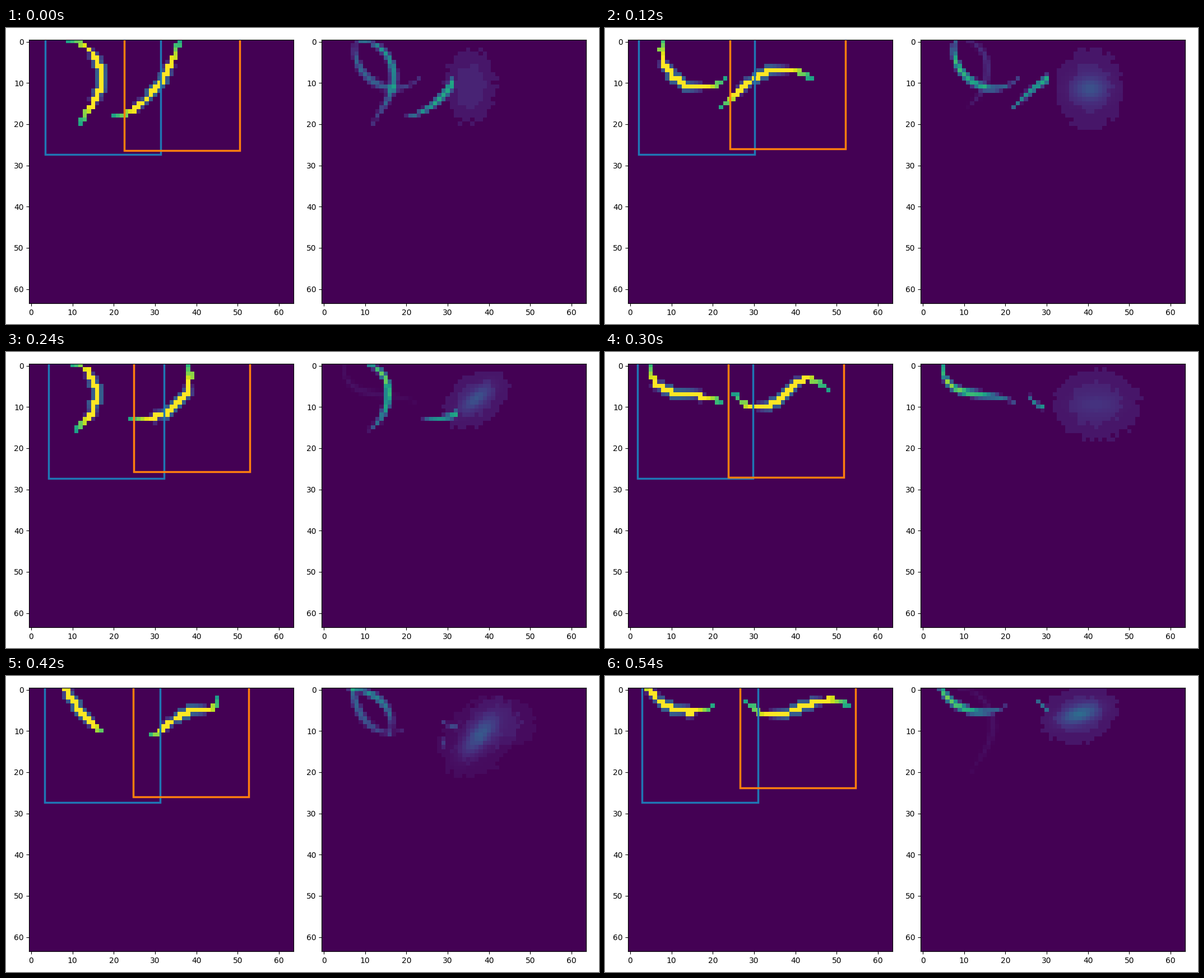
Recreate the animation shown at these times as a matplotlib script. Size 1058 by 529 pixels, loop 600 ms.

```python
import numpy as np
import matplotlib.pyplot as plt
from matplotlib.animation import FuncAnimation
from matplotlib.patches import Rectangle

W, H, DPI = 1058, 529, 100
SIZE, FRAMES, INTERVAL = 64, 10, 60
BOX, BLUE_BOTTOM = 28, 27.4
U = np.linspace(0, 1, 150)
YY, XX = np.mgrid[:SIZE, :SIZE]
RAGGED = np.random.default_rng(4).normal(0, 0.05, (SIZE, SIZE))


def worm(*points):
    """Smooth polynomial curve through a few points, head first."""
    pts = np.array(points, float)
    chord = np.r_[0, np.cumsum(np.hypot(*np.diff(pts, axis=0).T))]
    coef = np.polyfit(chord / chord[-1], pts, len(pts) - 1)
    return np.column_stack([np.polyval(c, U) for c in coef.T])


def stroke(pts, tail=1.0):
    """Coverage of a body thickest half way, fading to `tail` at its end."""
    width = 0.1 + 1.5 * np.sin(np.pi * U)
    dist = np.hypot(XX[..., None] - pts[:, 0], YY[..., None] - pts[:, 1])
    cover = np.clip(width / 2 + 0.5 - dist, 0, 1)
    cover[cover < 0.08] = 0
    return (cover * (1 + (tail - 1) * U)).max(axis=2)


def cloud(x, y, rx, ry, tilt, peak):
    """Two flat ragged ellipses around a soft core."""
    dx, dy = XX - x, YY - y
    u = (dx * np.cos(tilt) + dy * np.sin(tilt)) / rx
    v = (dy * np.cos(tilt) - dx * np.sin(tilt)) / ry
    r = np.hypot(u, v) + RAGGED
    core = peak * np.exp(-(u / 0.33) ** 2 / 2 - (v / 0.2) ** 2 / 2)
    return 0.06 * (r < 1) + 0.04 * (r < 0.6) + core * (r < 1)


class Pose:
    """blue: left edge; orange: left and bottom; doubt: share of next pose."""

    def __init__(self, left, right, blue, orange, haze, doubt=0.0):
        self.left, self.right = worm(*left), worm(*right)
        self.boxes = np.array([(blue, BLUE_BOTTOM), orange])
        self.haze, self.doubt = cloud(*haze), doubt

    def guess(self, following):
        """Left worm mixed with its next pose, right worm only in the box."""
        inside = XX <= np.floor(self.boxes[0, 0] + BOX)
        lines = ((1 - self.doubt) * stroke(self.left, 0.4)
                 + self.doubt * stroke(following.left, 0.6)
                 + 0.6 * stroke(self.right) * inside)
        return np.clip(np.maximum(lines, self.haze), 0, 1)


POSES = {
    0: Pose([(9, 0), (15, 3), (17, 9), (15, 15), (12, 20)],
            [(36, 0), (33, 7), (29, 13), (20, 18.4)],
            3.4, (22.55, 26.45), (35.5, 11, 6, 9, 0, 0), doubt=0.38),
    2: Pose([(8, -1), (8.6, 6), (14.5, 11), (23, 9)],
            [(44, 9), (34, 7.3), (27.5, 11), (22, 16)],
            2.1, (24.2, 26), (40.5, 11.5, 8, 10, 0, 0.15), doubt=0.15),
    4: Pose([(10, -0.5), (15.2, 4), (15, 10.5), (11, 15.6)],
            [(38, -0.5), (37.3, 7), (33.5, 11), (24, 12.6)],
            4.2, (24.9, 25.65), (37, 8, 8.5, 6, -0.7, 0.16), doubt=0.05),
    5: Pose([(5, -1), (7, 5), (13, 7), (22, 9)],
            [(48, 6), (41, 4), (35, 9), (30, 10.3), (25.5, 7)],
            1.8, (23.75, 27.05), (42, 9.5, 10.5, 8.5, 0, 0.05)),
    6: Pose([(8, -6), (8, 4), (12, 9.3), (19, 10)],
            [(48, 6), (43.5, 6.2), (37.5, 3), (32.5, 6.5), (29, 13.6)],
            1.8, (23.6, 25.65), (43, 8, 8.5, 6, 0, 0), doubt=0.15),
    8: Pose([(6, -0.3), (12, 1.5), (15.5, 5), (16, 11)],
            [(42, -1), (41.8, 6), (37, 9), (29, 8)],
            4.7, (25.85, 26.25), (37.5, 11.5, 11, 8, -0.85, 0.4)),
    9: Pose([(4, -4), (6, 2), (11, 5), (20, 4.2)],
            [(53, 4), (45, 3), (37, 6), (28, 3)],
            2.9, (26.6, 23.75), (38, 6, 9.5, 7, -0.3, 0.25), doubt=0.05),
}
STEPS = list(POSES)
GUESSES = {step: POSES[step].guess(POSES[following])
           for step, following in zip(STEPS, STEPS[1:] + STEPS[:1])}


def blend(frame):
    """Worms, boxes and guess, eased linearly between key poses."""
    before = max(s for s in STEPS if s <= frame)
    after = min(s for s in STEPS if s >= frame)
    mix = (frame - before) / max(after - before, 1)
    a, b = POSES[before], POSES[after]
    pairs = [(a.left, b.left), (a.right, b.right), (a.boxes, b.boxes),
             (GUESSES[before], GUESSES[after])]
    return [(1 - mix) * p + mix * q for p, q in pairs]


fig = plt.figure(figsize=(W / DPI, H / DPI), dpi=DPI, facecolor="white")


def panel(x, y=20.9, side=471.4):
    ax = fig.add_axes([x / W, 1 - (y + side) / H, side / W, side / H])
    image = ax.imshow(np.zeros((SIZE, SIZE)), cmap="viridis", vmin=0, vmax=1,
                      interpolation="nearest")
    ax.set_xticks(range(0, SIZE, 10))
    ax.set_yticks(range(0, SIZE, 10))
    return ax, image


left_ax, left_image = panel(41.3)
right_ax, right_image = panel(563.4)
boxes = [left_ax.add_patch(Rectangle((0, 0), BOX, BOX, fill=False,
                                     edgecolor=color, linewidth=2.5))
         for color in ("C0", "C1")]


def update(frame):
    left, right, corners, guess = blend(frame)
    # Centre lines snap to whole cells, which gives the stepped outline.
    left_image.set_data(np.maximum(stroke(left.round()),
                                   stroke(right.round())))
    right_image.set_data(guess)
    for box, (x, bottom) in zip(boxes, corners):
        box.set_xy((x, bottom - BOX))
    return [left_image, right_image, *boxes]


anim = FuncAnimation(fig, update, frames=FRAMES, interval=INTERVAL,
                     repeat=True, repeat_delay=0, blit=False)
plt.show()
```
